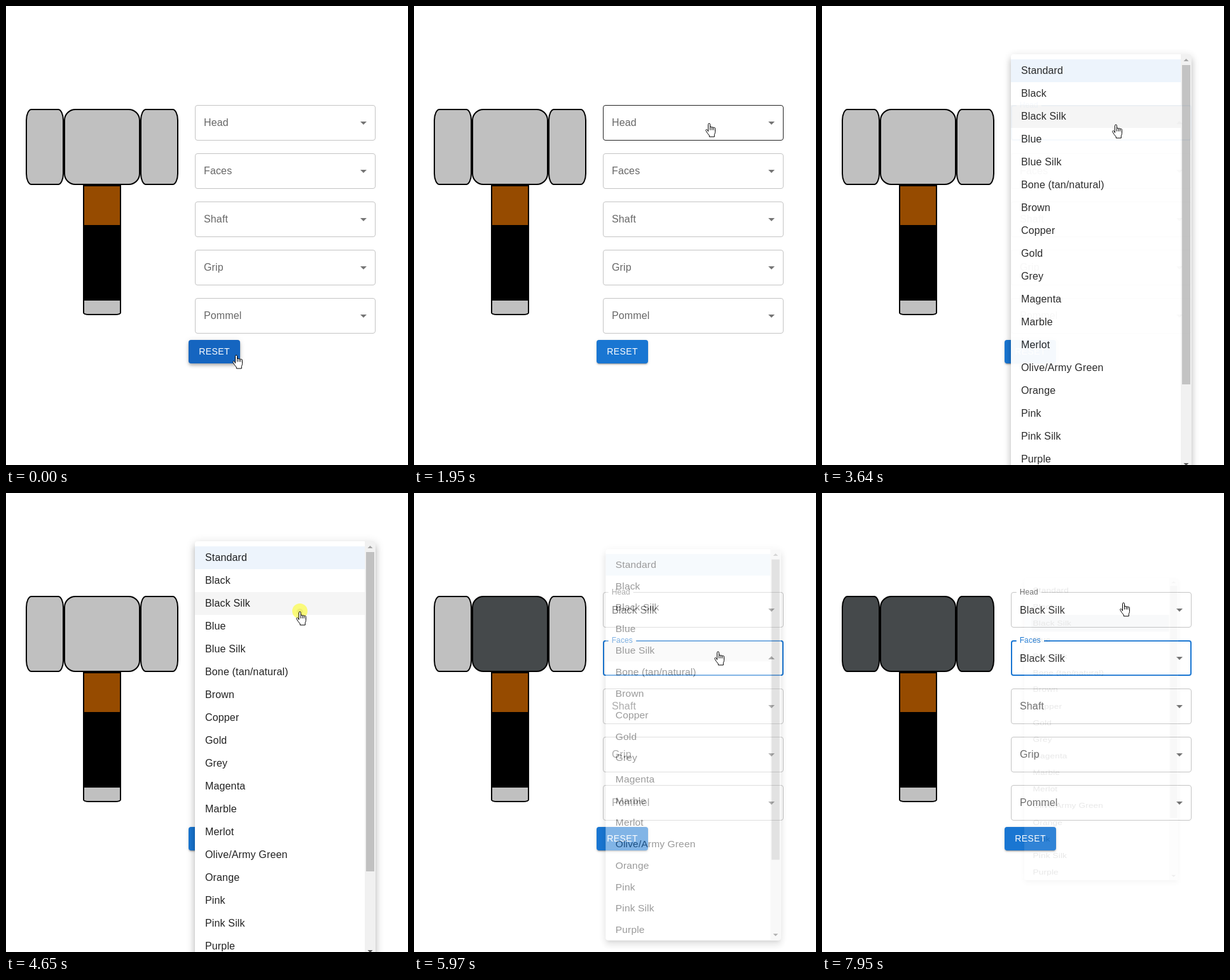
These frames come from a looping animation (632x723 px, 8 s). An HTML page:

```html
<!DOCTYPE html>
<html lang="en">
<head>
<meta charset="utf-8">
<title>Hammer builder</title>
<style>
  * { box-sizing: border-box; }
  html, body { margin: 0; width: 100%; height: 100%; overflow: hidden; background: #fff; }
  body { position: relative; font: 16px/23px "Liberation Sans", Arial, sans-serif; letter-spacing: .15px; color: rgba(0,0,0,.87); }
  div, span, svg { position: absolute; white-space: nowrap; }
  .part { border: 2px solid #000; background: #c0c0c0; }
  .face { top: 162px; width: 60px; height: 120px; border-radius: 15%; }
  .field { left: 297px; width: 284px; height: 56px; }
  .frame { inset: 0; border: 1px solid #c4c4c4; border-radius: 4px; }
  .label { left: 0; top: 0; margin-left: -6.67px; padding: 0 6.67px; background: #fff; transform-origin: 6.67px 0; }
  .value { left: 14px; top: 16.5px; }
  .icon { left: 253px; top: 16px; fill: rgba(0,0,0,.54); }
  #reset { left: 287px; top: 526px; width: 81px; height: 36.5px; border-radius: 4px; color: #fff;
    font-size: 14px; line-height: 36.5px; letter-spacing: .4px; text-align: center; }
  #menu { left: 297px; top: 76px; width: 284px; height: 655px; border-radius: 4px; overflow: hidden; background: #fff;
    box-shadow: 0 5px 5px -3px rgba(0,0,0,.2), 0 8px 10px 1px rgba(0,0,0,.14), 0 3px 14px 2px rgba(0,0,0,.12); }
  .item { left: 0; width: 267px; height: 36px; padding-left: 16px; line-height: 36px; overflow: hidden; }
  #ripple { border-radius: 50%; background: #000; }
  #bar { left: 267px; top: 0; width: 17px; height: 655px; background: #f1f1f1; }
  #thumb { left: 2px; top: 17px; width: 13px; height: 503px; background: #c1c1c1; }
  #flash { width: 24px; height: 24px; border-radius: 50%; background: rgba(255,255,0,.5); }
  .cursor { left: 0; top: 0; fill: #fff; stroke: #000; overflow: visible; }
</style>
</head>
<body>
<div class="part face" style="left:31px"></div>
<div class="part face" style="left:211px"></div>
<div class="part face" id="head" style="left:91px;width:120px"></div>
<div class="part" style="left:121px;top:282px;width:60px;height:65px;background:#964b00"></div>
<div class="part" style="left:121px;top:345px;width:60px;height:118px;background:#000"></div>
<div class="part" style="left:121px;top:462px;width:60px;height:25px;border-radius:0 0 15% 15%"></div>
<div id="reset">RESET</div>
<div id="menu">
  <div id="bar">
    <div id="thumb"></div>
    <svg width="17" height="655"><path d="M4.500 11h8l-4-4z" fill="#a3a3a3"/><path d="M4.500 644h8l-4 4z" fill="#505050"/></svg>
  </div>
</div>
<div id="flash"></div>
<svg class="cursor" id="hand" width="17" height="23">
  <path d="M4.500 13V2a1.500 1.500 0 0 1 3 0V7a1.400 1.400 0 0 1 2.800.3a1.300 1.300 0 0 1 2.600.6a1.300 1.300 0 0 1 2.600.8V14q0 2-1.200 4V21.500H6.300V19.500Q3 16 1 12q-.8-1.500.5-2q1-.4 1.800 1z"/>
  <path d="M7.500 7v4M10.300 7.500v3.500M12.900 8v3" fill="none"/>
</svg>
<svg class="cursor" id="arrow" width="13" height="20">
  <path d="M.5 .5V16l3.600-3.400 2.500 5.700 2.300-1-2.400-5.500h5z"/>
</svg>
<script>
const LOOP = 8000, BLUE = '#1976d2', DARK = '#45494b', SILVER = '#c0c0c0', PICK = 2;
const colours = ['Standard', 'Black', 'Black Silk', 'Blue', 'Blue Silk', 'Bone (tan/natural)', 'Brown', 'Copper',
  'Gold', 'Grey', 'Magenta', 'Marble', 'Merlot', 'Olive/Army Green', 'Orange', 'Pink', 'Pink Silk', 'Purple'];
const visits = [
  { field: 0, press: 3360, open: 3372, click: 4650, close: 4842 },
  { field: 1, press: 5840, open: 5852, click: 7530, close: 7722 }
];
// time, x, y of the pointer tip
const path = [[0, 362, 550], [870, 362, 550], [1220, 389, 428], [1610, 450, 243], [1950, 464, 185],
  [3360, 464, 185], [3500, 462, 187], [5200, 462, 187], [5640, 478, 250], [6430, 478, 250], [7140, 474, 173], [LOOP, 474, 173]];

const $ = id => document.getElementById(id);
const clamp = v => Math.max(0, Math.min(1, v));
const mix = (a, b, k) => a + (b - a) * k;
const show = (el, on) => el.style.display = on ? '' : 'none';

function add(parent, cls, text = '') {
  const el = document.createElement('div');
  el.className = cls;
  el.textContent = text;
  parent.append(el);
  return el;
}

// cubic-bezier(.4, 0, .2, 1)
function ease(x) {
  x = clamp(x);
  let lo = 0, hi = 1;
  for (let i = 0; i < 20; i++) {
    const u = (lo + hi) / 2, v = 1 - u;
    if (1.2 * v * v * u + .6 * v * u * u + u * u * u < x) lo = u; else hi = u;
  }
  return lo * lo * (3 - 2 * lo);
}

// Smooth curve through the path points, at rest next to every pause
function pointer(t) {
  let i = 0;
  while (i < path.length - 2 && t >= path[i + 1][0]) i++;
  const a = path[i], b = path[i + 1], d = b[0] - a[0], s = (t - a[0]) / d;
  const still = (p, q) => !p || !q || (p[1] === q[1] && p[2] === q[2]);
  const slope = (k, c) => {
    const p = path[k - 1], q = path[k], r = path[k + 1];
    return still(p, q) || still(q, r) ? 0 : (r[c] - p[c]) / (r[0] - p[0]);
  };
  return [1, 2].map(c => mix(a[c], b[c], s * s * (3 - 2 * s)) +
    d * (slope(i, c) * s * (1 - s) ** 2 - slope(i + 1, c) * s * s * (1 - s)));
}

const fields = ['Head', 'Faces', 'Shaft', 'Grip', 'Pommel'].map((name, i) => {
  const box = add(document.body, 'field'), top = 156 + 76 * i;
  box.style.top = top + 'px';
  const frame = add(box, 'frame'), label = add(box, 'label', name), value = add(box, 'value', colours[PICK]);
  box.insertAdjacentHTML('beforeend', '<svg class="icon" width="24" height="24"><path d="M7 10l5 5 5-5z"/></svg>');
  document.body.insertBefore(box, $('menu'));
  return { top, frame, label, value, icon: box.lastChild };
});
const items = colours.map((name, i) => {
  const el = add($('menu'), 'item', name);
  el.style.top = 8 + 36 * i + 'px';
  return el;
});
const ripple = add(items[PICK], '');
ripple.id = 'ripple';
const faces = [...document.querySelectorAll('.face')].slice(0, 2);

function drawFields(t, y, busy) {
  const focus = visits.filter(v => t >= v.open).pop();
  fields.forEach((f, i) => {
    const visit = visits[i], focused = focus && focus.field === i;
    const hover = !busy && y >= f.top && y < f.top + 56;
    const k = visit ? 1 - (1 - clamp((t - visit.open) / 130)) ** 3 : 0;
    f.frame.style.border = focused ? '2px solid ' + BLUE : '1px solid ' + (hover ? '#212121' : '#c4c4c4');
    f.label.style.color = focused ? BLUE : 'rgba(0,0,0,.6)';
    f.label.style.transform = `translate(14px,${mix(16, -9, k)}px) scale(${mix(1, .75, k)})`;
    show(f.value, visit && t >= visit.close);
    f.icon.style.transform = visit && t >= visit.open && t < visit.close ? 'rotate(180deg)' : '';
  });
}

function drawMenu(t, visit, x, y) {
  const menu = $('menu');
  show(menu, visit);
  if (!visit) return;
  const closing = t >= visit.close;
  const alpha = closing ? 1 - ease((t - visit.close) / 360) : ease((t - visit.open) / 360);
  const grow = closing ? 1 - ease((t - visit.close - 129) / 257) : ease((t - visit.open) / 197);
  const scale = mix(.75, 1, grow);
  menu.style.opacity = alpha;
  menu.style.transformOrigin = `142px ${fields[visit.field].top - 20}px`;
  menu.style.transform = `scale(${scale},${scale * scale})`;
  const hovered = closing ? PICK : Math.floor((y - 84) / 36), selected = closing ? PICK : 0;
  items.forEach((el, i) => el.style.background =
    i === selected ? `rgba(25,118,210,${i === hovered ? .12 : .08})` : i === hovered ? '#f5f5f5' : '');

  const age = t - visit.click;
  show(ripple, age >= 0);
  const r = mix(5, 170, ease(age / 550));
  Object.assign(ripple.style, {
    width: 2 * r + 'px', height: 2 * r + 'px', left: x - 297 - r + 'px', top: y - 156 - r + 'px',
    opacity: mix(.1, .3, clamp(age / 300)) * (1 - clamp((t - visit.close) / 550))
  });
}

function drawPointer(t, x, y, busy) {
  const pressed = visits.some(v => t >= v.press && t < v.press + 70);
  const clicked = visits.some(v => t >= v.click && t < v.click + 140);
  const over = busy || (y >= 526 && y < 563 && x < 368) || fields.some(f => y >= f.top && y < f.top + 56);
  const hand = over && !pressed;
  show($('hand'), hand);
  show($('arrow'), !hand);
  $('hand').style.transform = `translate(${x - 6}px,${y - .5}px)`;
  $('arrow').style.transform = `translate(${x}px,${y}px)`;
  show($('flash'), pressed || clicked);
  $('flash').style.transform = `translate(${x - 12}px,${y - 13}px)`;
}

function drawReset(t) {
  const k = ease((t - 990) / 220), px = (a, b) => mix(a, b, k) + 'px';
  const style = $('reset').style;
  style.background = `rgb(${mix(21, 25, k)},${mix(101, 118, k)},${mix(192, 210, k)})`;
  style.boxShadow = `0 ${px(2, 3)} ${px(4, 1)} ${px(-1, -2)} rgba(0,0,0,.2),` +
    `0 ${px(4, 2)} ${px(5, 2)} rgba(0,0,0,.14), 0 1px ${px(10, 5)} rgba(0,0,0,.12)`;
}

function render(t) {
  const [x, y] = pointer(t);
  const visit = visits.find(v => t >= v.open && t < v.close + 386);
  $('head').style.background = t >= visits[0].close ? DARK : SILVER;
  faces.forEach(el => el.style.background = t >= visits[1].close ? DARK : SILVER);
  drawReset(t);
  drawFields(t, y, visit);
  drawMenu(t, visit, x, y);
  drawPointer(t, x, y, visit);
}

const start = performance.now();
function tick() {
  render((performance.now() - start) % LOOP);
  requestAnimationFrame(tick);
}
tick();
</script>
</body>
</html>
```
